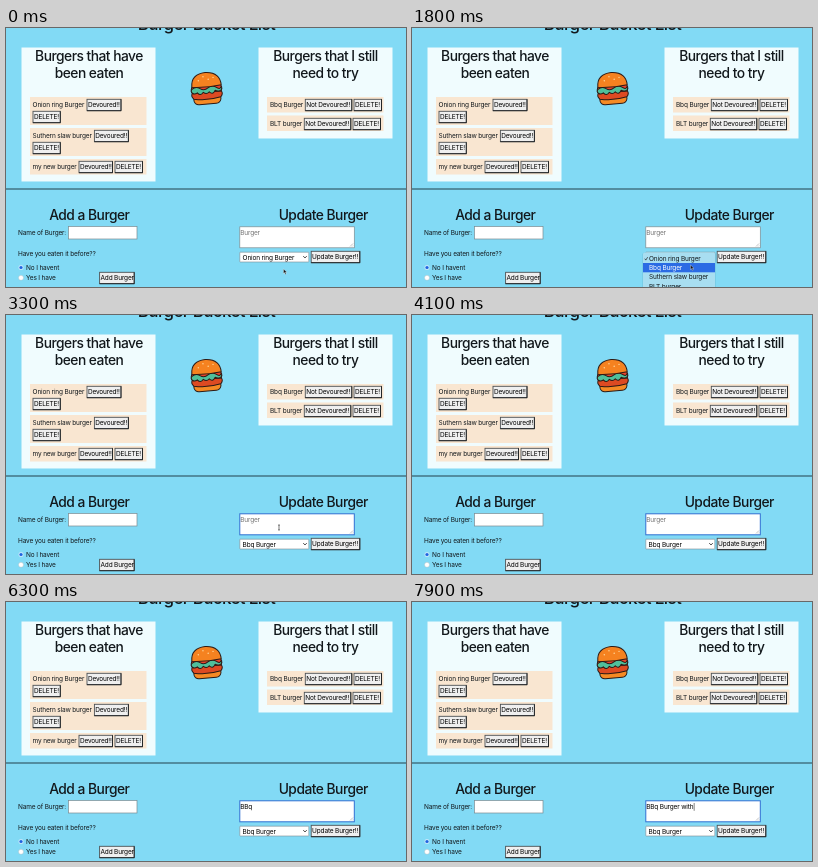
Write an HTML page that moves like this. It is 400x259 px and loops after 8000 ms.

```html
<!DOCTYPE html>
<html lang="en">
<head>
<meta charset="utf-8">
<title>Burger list</title>
<style>
  html, body { margin: 0; width: 100%; height: 100%; overflow: hidden; background: #82daf5; }
  svg { display: block; width: 100vw; height: 100vh; }
  text {
    font: 6.5px Inter, Roboto, sans-serif; font-optical-sizing: none;
    letter-spacing: -.025em; fill: #12181c; white-space: pre;
  }
  .head, .title { font-weight: 500; letter-spacing: -.037em; text-anchor: middle; }
  .head { font-size: 13.8px; }
  .title { font-size: 17px; }
  .btn { fill: #000; }
  .hint { fill: #757575; }
  .lit { fill: #fff; }
</style>
</head>
<body>
<svg id="stage" viewBox="0 0 400 259" preserveAspectRatio="none"></svg>
<script>
const LOOP = 8000, OPEN = 700, CLOSE = 2200, FOCUS = 3000;
const burgers = ['Onion ring Burger', 'Bbq Burger', 'Suthern slaw burger', 'BLT burger'];

// y is the vertical middle of small text
const text = (x, y, s, cls = '') => `<text x="${x}" y="${y + 2.4}" class="${cls}">${s}</text>`;
const head = (x, base, s, cls = 'head') => `<text x="${x}" y="${base}" class="${cls}">${s}</text>`;
const rect = (x, y, w, h, fill, extra = '') =>
  `<rect x="${x}" y="${y}" width="${w}" height="${h}" fill="${fill}" ${extra}/>`;
const circle = (x, y, r, fill, extra = '') =>
  `<circle cx="${x}" cy="${y}" r="${r}" fill="${fill}" ${extra}/>`;
const path = (d, fill, extra = '') => `<path d="${d}" fill="${fill}" ${extra}/>`;
const button = (x, y, w, s) =>
  rect(x, y - 5.7, w, 11.4, '#efefef', 'stroke="#4c5154" stroke-width=".9"') +
  path(`M${x} ${y + 5.7}h${w}v-11.4`, 'none', 'stroke="#1d2123" stroke-width=".9"') +
  text(x + .9, y, s, 'btn');
const row = (x, y, h) => rect(x, y, 116.5, h, '#f9e6d1');

function burgerIcon() {
  const ink = 'stroke="#2b1a16" stroke-width="1" stroke-linejoin="round"';
  const seeds = [[193, 52], [198, 48.5], [203, 51.5], [208, 50]];
  return '<g transform="rotate(-5 200.5 60.5)">' +
    path('M187 69q13 3 27 0v3q-1 4-5 4h-17q-4 0-5-4z', '#f58a24', ink) +
    path('M186 64h29q2 3-1 6-13 3-27 0-3-3-1-6z', '#dd4a22', ink) +
    path('M187 57h27q3 3 1 7h-29q-2-4 1-7z', '#e8432c', ink) +
    path('M186 60q4-3 8 0t8 0 8 0 5 0q2 3-2 4-3 0-4-1-3 5-6 1-3 3-6 0-3 4-6 0-3 2-5 0-2-2 0-4z', '#4fbf9b', ink) +
    path('M186 58q0-13 14.500-13.500 14.500.5 15 13.500-14 2-29.500 0z', '#f58220', ink) +
    seeds.map(([x, y]) => circle(x, y, .7, '#ffd79a')).join('') + '</g>';
}

const page =
  rect(0, 0, 400, 259, '#82daf5') +
  head(200.5, 2, 'Burger Bucket List', 'title') +
  rect(15.5, 19.5, 134, 134, '#f0fcfe') + rect(252.5, 19.5, 134, 91, '#f0fcfe') +
  head(83, 33, 'Burgers that have') + head(83, 49.7, 'been eaten') +
  head(319.5, 33, 'Burgers that I still') + head(319.5, 49.7, 'need to try') +
  row(24, 69, 28) + row(24, 100, 28) + row(24, 131, 15.5) +
  row(261, 69, 15.5) + row(261, 87.5, 15.5) +
  text(26.6, 77, burgers[0]) + button(81, 77, 34, 'Devoured!!') + button(27, 89, 27.3, 'DELETE!') +
  text(26.6, 108, burgers[2]) + button(88.4, 108, 34, 'Devoured!!') + button(27, 120, 27.3, 'DELETE!') +
  text(26.6, 139, 'my new burger') + button(73, 139, 33.5, 'Devoured!!') + button(109, 139, 27.5, 'DELETE!') +
  text(264, 77, burgers[1]) + button(299.3, 77, 46.5, 'Not Devoured!!') + button(348, 77, 27.5, 'DELETE!') +
  text(264, 96, burgers[3]) + button(298.3, 96, 46.5, 'Not Devoured!!') + button(347, 96, 27.5, 'DELETE!') +
  burgerIcon() +
  rect(0, 160.5, 400, 1, '#25424d') +
  head(83.3, 192, 'Add a Burger') + head(317.3, 192, 'Update Burger') +
  text(12, 205, 'Name of Burger:') +
  rect(62.5, 198.5, 68.5, 12.5, '#fff', 'stroke="#7d8a90" stroke-width=".7"') +
  text(12, 226, 'Have you eaten it before??') +
  circle(15, 239.5, 2.5, '#c4e6fa') + circle(15, 239.5, 1.6, '#1f63e0') +
  circle(15, 249.8, 2.5, '#fff', 'stroke="#a5b5bb" stroke-width=".4"') +
  text(20, 239.5, 'No I havent') + text(20, 250, 'Yes I have') +
  button(93.6, 250, 34.6, 'Add Burger') + button(305.2, 229, 48.6, 'Update Burger!!');

// typed characters with the time of each key
const keys = [['B', 4200], ['B', 4500], ['q', 5600],
  ...[...' Burger with'].map((c, i) => [c, 6500 + i * 115])];

function textarea(t) {
  const done = keys.filter(k => k[1] <= t);
  const typed = done.map(k => k[0]).join('');
  const focused = t >= FOCUS;
  const last = done.length ? done[done.length - 1][1] : FOCUS;
  const caret = focused && (t - last) % 1000 < 500 ? '<tspan fill="#000" dx="-.4">|</tspan>' : '';
  return rect(233.8, 198.8, 114.5, 21, '#fff',
      focused ? 'stroke="#2f6fd2" stroke-width="1"' : 'stroke="#7d8a90" stroke-width=".7"') +
    path('M344 218.500l3-3M346 218.500l1-1', 'none', 'stroke="#888" stroke-width=".5"') +
    (typed ? '' : text(234.2, 204.3, 'Burger', 'hint')) +
    text(234.2, 204.3, typed + (typed ? caret : ''), 'btn');
}

function select(t) {
  return rect(233.8, 224.2, 69, 9.8, '#fff', 'stroke="#7d8a90" stroke-width=".6" rx=".5"') +
    text(236.6, 229.2, burgers[t < CLOSE ? 0 : 1], 'btn') +
    path('M297.300 228.200l1.700 1.700 1.700-1.700', 'none', 'stroke="#222" stroke-width=".9"');
}

function menu(t) {
  if (t < OPEN || t >= CLOSE) return '';
  const active = cursor(t).y < 234 ? 0 : 1;
  const top = 225.7, step = 9.3;
  return rect(230.5, 224.5, 73, 40, '#5fa9c2', 'opacity=".5" rx="2"') +
    rect(231, 224.5, 72, 40, '#a8def1', 'rx="1.5"') +
    rect(231, top + active * step, 72, step, '#2b6be4') +
    path('M232.800 230.700l1 1.400 1.900-3', 'none',
      `stroke="${active ? '#222' : '#fff'}" stroke-width=".7"`) +
    burgers.map((s, i) => text(237, 230.4 + i * step, s, i === active ? 'lit' : '')).join('');
}

const route = [[0, 277.5, 241], [350, 277.5, 241], [650, 280.5, 228], [1100, 280.5, 228],
  [1500, 278.5, 237], [2250, 278.5, 237], [2850, 273, 212.5], [4100, 273, 212.5]];

function cursor(t) {
  const i = route.findIndex(p => p[0] > t);
  if (i < 0) return null;
  const [t0, x0, y0] = route[i - 1], [t1, x1, y1] = route[i];
  const u = (t - t0) / (t1 - t0), k = u * u * (3 - 2 * u);
  return { x: x0 + (x1 - x0) * k, y: y0 + (y1 - y0) * k };
}

function pointer(t) {
  const p = cursor(t);
  if (!p) return '';
  const beam = p.y < 220;
  return `<g transform="translate(${p.x} ${p.y})">` + (beam
    ? path('M-1-2.700q1 0 1 .7v4q0 .7-1 .7M1-2.700q-1 0-1 .7M0 2q0 .7 1 .7', 'none', 'stroke="#222" stroke-width=".6"')
    : path('M0 0v4.600l1.100-1 .8 1.800.8-.4-.8-1.700h1.500z', '#111', 'stroke="#fff" stroke-width=".35"')) + '</g>';
}

const stage = document.getElementById('stage');
stage.innerHTML = page + '<g id="live"></g>';
const live = document.getElementById('live');

function draw() {
  const t = performance.now() % LOOP;
  live.innerHTML = textarea(t) + select(t) + menu(t) + pointer(t);
  requestAnimationFrame(draw);
}
draw();
</script>
</body>
</html>
```
